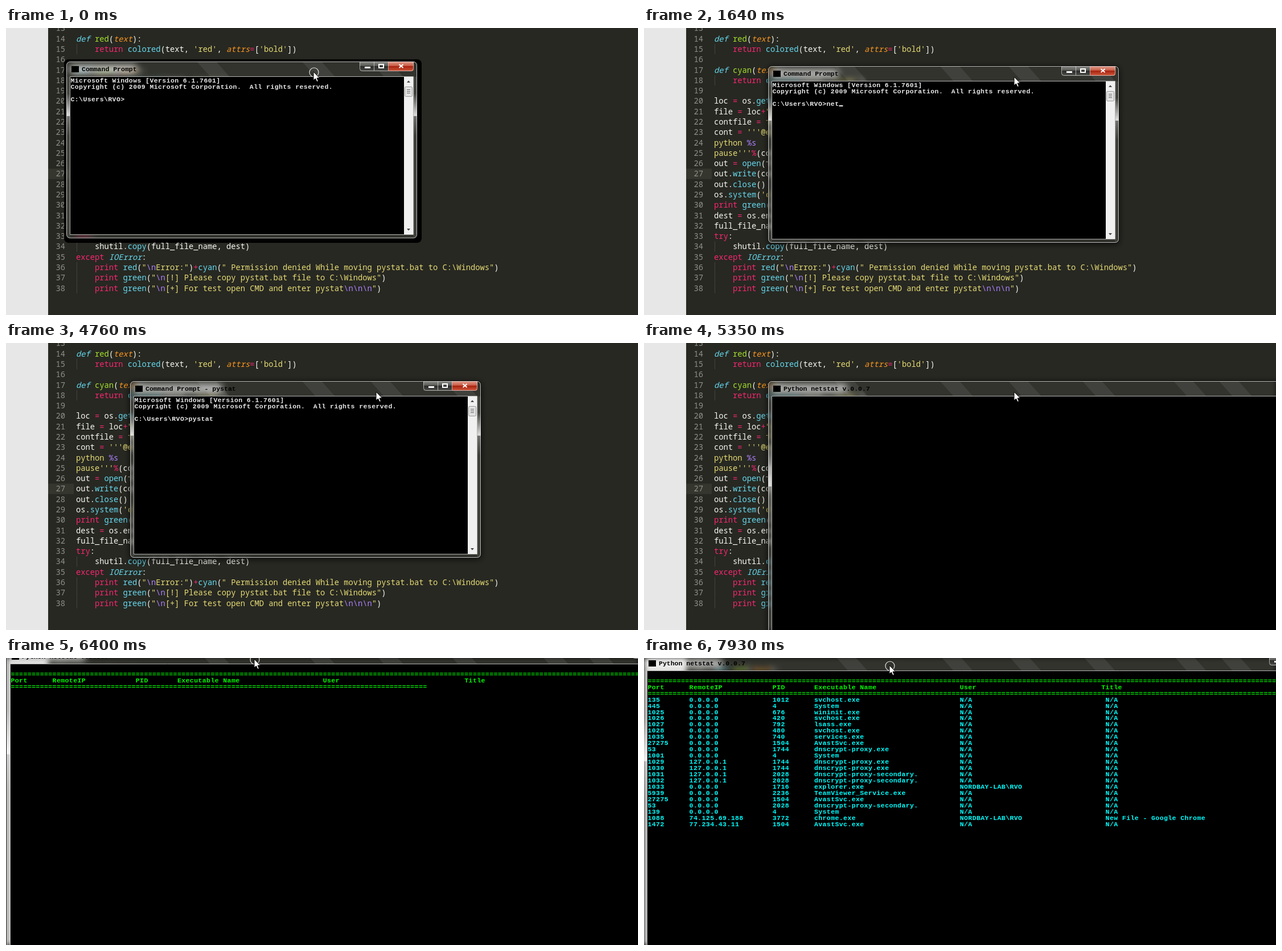
Animation of 1110 by 505 pixels, one loop 8 s. Source, as an HTML page with a canvas:

```html
<!DOCTYPE html>
<html lang="en">
<head>
<meta charset="utf-8">
<title>Command prompt over a code editor</title>
<style>
html, body { margin: 0; width: 1110px; height: 505px; overflow: hidden; background: #272822; }
canvas { display: block; }
</style>
</head>
<body>
<canvas id="stage" width="1110" height="505"></canvas>
<script>
const W = 1110, H = 505, LOOP = 8000;
const ctx = document.getElementById('stage').getContext('2d');

// ---------- Editor page ----------
// Each piece starts with its style letter; a capital means italic.
const INK = { w: '#f8f8f2', p: '#f92672', b: '#66d9ef', g: '#a6e22e', o: '#fd971f', y: '#e6db74', v: '#ae81ff' };
const SOURCE = [
  '',
  'Bdef |gred|w(|Otext|w):',
  "w    |preturn |bcolored|w(text, |y'red'|w, |Oattrs|p=|w[|y'bold'|w])",
  '',
  'Bdef |gcyan|w(|Otext|w):',
  "w    |preturn |bcolored|w(text, |y'cyan'|w)",
  '',
  'wloc |p= |wos.|bgetcwd|w()',
  'wfile |p= |wloc|p+|y"pystat.py"',
  'wcontfile |p= |yfile',
  "wcont |p= |y'''@echo off",
  'ypython |v%s',
  "ypause'''|p%|w(contfile)",
  'wout |p= |bopen|w(file)',
  'wout.|bwrite|w(cont)',
  'wout.|bclose|w()',
  "wos.|bsystem|w(|y'cls'|w)",
  'pprint |bgreen|w(loc)',
  'wdest |p= |wos.environ',
  'wfull_file_name |p= |wfile',
  'ptry|w:',
  'w    shutil.|bcopy|w(full_file_name, dest)',
  'pexcept |BIOError|w:',
  'w    |pprint |bred|w(|y"|v\\n|yError:"|w)|p+|bcyan|w(|y" Permission denied While moving pystat.bat to C:\\Windows"|w)',
  'w    |pprint |bgreen|w(|y"|v\\n|y[!] Please copy pystat.bat file to C:\\Windows"|w)',
  'w    |pprint |bgreen|w(|y"|v\\n|y[+] For test open CMD and enter pystat|v\\n\\n\\n|y"|w)'
];
const CODE_FONT = '13.75px "Noto Sans Mono", monospace', CODE_CELL = 8.25, CODE_LINE = 18.29;

function drawPage() {
  const page = document.createElement('canvas');
  page.width = W;
  page.height = H;
  const c = page.getContext('2d');
  const box = (color, x, y, w, h) => { c.fillStyle = color; c.fillRect(x, y, w, h); };
  box('#272822', 0, 0, W, H);
  box('#e7e7e7', 0, 0, 74, H);
  box('#35362e', 74, 247.5, 45, 18.3);
  SOURCE.forEach((line, i) => {
    const y = 5.4 + i * CODE_LINE;
    c.font = CODE_FONT;
    c.fillStyle = '#8f908a';
    c.textAlign = 'right';
    c.fillText(13 + i, 104, y);
    c.textAlign = 'left';
    if (line.startsWith('w    ')) box('#42433c', 124, y - 14, 1, CODE_LINE);
    let x = 123;
    for (const piece of line.split('|').filter(Boolean)) {
      const style = piece[0], text = piece.slice(1), low = style.toLowerCase();
      c.font = (style === low ? '' : 'italic ') + CODE_FONT;
      c.fillStyle = INK[low];
      c.fillText(text, x, y);
      x += text.length * CODE_CELL;
    }
  });
  return page;
}
const page = drawPage();

// ---------- Console contents ----------
const CELL = 7.31, ROW = 10.97, COLS = 160;
const LIME = '#00ff00', AQUA = '#00ffff', PALE = '#e8e8e8';
const USER = 'NORDBAY-LAB\\RVO';

const columns = (port, ip, pid, exe, user, title) =>
  (port.padEnd(10) + ip.padEnd(20) + pid.padEnd(10) + exe.padEnd(35) + user).padEnd(title === 'Title' ? 109 : 110) + title;

const CONNECTIONS = `135 0.0.0.0 1012 svchost.exe
445 0.0.0.0 4 System
1025 0.0.0.0 676 wininit.exe
1026 0.0.0.0 420 svchost.exe
1027 0.0.0.0 792 lsass.exe
1028 0.0.0.0 480 svchost.exe
1035 0.0.0.0 740 services.exe
27275 0.0.0.0 1504 AvastSvc.exe
53 0.0.0.0 1744 dnscrypt-proxy.exe
1001 0.0.0.0 4 System
1029 127.0.0.1 1744 dnscrypt-proxy.exe
1030 127.0.0.1 1744 dnscrypt-proxy.exe
1031 127.0.0.1 2028 dnscrypt-proxy-secondary.
1032 127.0.0.1 2028 dnscrypt-proxy-secondary.
1033 0.0.0.0 1716 explorer.exe
5939 0.0.0.0 2236 TeamViewer_Service.exe
27275 0.0.0.0 1504 AvastSvc.exe
53 0.0.0.0 2028 dnscrypt-proxy-secondary.
139 0.0.0.0 4 System
1088 74.125.69.188 3772 chrome.exe
1472 77.234.43.11 1504 AvastSvc.exe`.split('\n').map(line => {
  const cells = line.split(' '), exe = cells[3];
  const own = exe === 'explorer.exe' || exe === 'chrome.exe';
  return columns(...cells, own ? USER : 'N/A', exe === 'chrome.exe' ? 'New File - Google Chrome' : 'N/A');
});
const RULE = '='.repeat(COLS);
const TABLE = ['', RULE, columns('Port', 'RemoteIP', 'PID', 'Executable Name', 'User', 'Title'), RULE, ...CONNECTIONS];
const PROMPT = 'C:\\Users\\RVO>';
const BANNER = ['Microsoft Windows [Version 6.1.7601]',
  'Copyright (c) 2009 Microsoft Corporation.  All rights reserved.', ''];

// ---------- Timeline ----------
const TYPED = [[0, ''], [1400, 'n'], [1520, 'ne'], [1640, 'net'], [2200, 'ne'], [2350, 'n'], [2500, ''],
  [2650, 'p'], [2800, 'py'], [3260, 'pys'], [3440, 'pyst'], [3620, 'pysta'], [3800, 'pystat']];
const CARET_FLIPS = [534, 1120, 1640, 2200, 2650, 3260, 3620, 3800, 4110, 4760];
const TITLES = [[0, 'Command Prompt'], [4260, 'Command Prompt - pystat'], [5350, 'Python netstat v.0.0.7']];
// start, end, number of hard steps
const STEPS = [[120, 810, 6], [5350, 6250, 7], [6400, 7330, 8], [7480, 7930, 4]];
// time, window x, y, pointer x, y, printed table rows
const KEYS = [
  [0, 106, 59, 540, 77, 0],
  [810, 218, 67, 650, 86, 0],
  [5350, 218, 67, 650, 86, 0],
  [5500, 218, 67, 650, 86, 4],
  [5800, 163, 43, 571, 51, 9],
  [6250, 10, -13, 444, 5, 25],
  [6400, 1, -16, 436, 2, 3.625],
  [7330, 5, -3, 436, 16, 9.625],
  [7930, -1, -4, 431, 13, 25]
];

const latest = (list, t) => list.findLast(item => item[0] <= t)[1];

function snap(t) {
  let time = 0;
  for (const [start, end, n] of STEPS) {
    if (t < start) break;
    const gap = (end - start) / (n - 1);
    time = start + gap * Math.min(n - 1, Math.floor((t - start) / gap + 1e-6));
  }
  return time;
}

function pose(time) {
  const i = KEYS.findLastIndex(key => key[0] <= time), a = KEYS[i], b = KEYS[i + 1] || a;
  const k = b === a ? 0 : (time - a[0]) / (b[0] - a[0]);
  return a.map((v, j) => v + (b[j] - v) * k).slice(1);
}

// ---------- Drawing ----------
function fill(color, x, y, w, h, radius = 0) {
  ctx.fillStyle = color;
  ctx.beginPath();
  ctx.roundRect(x, y, w, h, radius);
  ctx.fill();
}

function outline(color, x, y, w, h, radius = 0) {
  ctx.strokeStyle = color;
  ctx.lineWidth = 1;
  ctx.beginPath();
  ctx.roundRect(x + .5, y + .5, w - 1, h - 1, radius);
  ctx.stroke();
}

function polygon(color, ...points) {
  ctx.fillStyle = color;
  ctx.beginPath();
  points.forEach(([x, y]) => ctx.lineTo(x, y));
  ctx.closePath();
  ctx.fill();
}

function gradient(y0, y1, ...stops) {
  const g = ctx.createLinearGradient(0, y0, 0, y1);
  stops.forEach(([at, color]) => g.addColorStop(at, color));
  return g;
}

function drawShadow(x, y, w, h, dragged) {
  if (dragged) return fill('#000', x - 4, y - 4, w + 12, h + 12, 8);
  ctx.save();
  ctx.shadowColor = 'rgba(0,0,0,.75)';
  ctx.shadowBlur = 12;
  ctx.shadowOffsetY = 2;
  fill('#000', x, y, w, h, 6);
  ctx.restore();
}

function drawGlass(x, y, w, h, title) {
  ctx.save();
  ctx.beginPath();
  ctx.roundRect(x, y, w, h, 6);
  ctx.clip();
  ctx.filter = 'blur(4px)';
  ctx.drawImage(page, 0, 0);
  ctx.filter = 'none';
  fill('rgba(130,130,125,.12)', x, y, w, h);
  for (const sx of [335, 520, 640, 770, 930, 1010])
    polygon('rgba(255,255,255,.07)', [sx, y], [sx + 34, y], [sx + 58, y + 27], [sx + 24, y + 27]);

  const shine = gradient(y, y + h, [.18, 'rgba(255,255,255,.08)'], [.3, 'rgba(255,255,255,.8)'],
    [.308, 'rgba(255,255,255,.8)'], [.31, 'rgba(255,255,255,.3)'], [.42, 'rgba(255,255,255,.06)']);
  fill(shine, x, y + 27, 7, h);
  fill(shine, x + w - 7, y + 27, 7, h);

  ctx.font = '10.4px "Open Sans", sans-serif';
  ctx.filter = 'blur(6px)';
  fill('rgba(255,255,255,.62)', x + 5, y + 5, ctx.measureText(title).width + 30, 17, 8);
  ctx.filter = 'none';
  ctx.restore();

  outline('rgba(0,0,0,.85)', x - 1, y - 1, w + 2, h + 2, 7);
  outline('rgba(235,235,235,.75)', x, y, w, h, 6);
  fill('#000', x + 9, y + 8, 13, 11);
  ctx.fillStyle = '#000';
  ctx.fillText(title, x + 27, y + 17);
}

function drawButtons(right, y) {
  const gray = gradient(y, y + 17, [0, '#8b8b88'], [.48, '#555552'], [.5, '#2c2c2a'], [1, '#4d4d4a']);
  const red = gradient(y, y + 17, [0, '#e0a090'], [.48, '#c8553f'], [.5, '#a82410'], [1, '#d0583c']);
  fill(gray, right - 101, y, 51, 17, [0, 0, 0, 4]);
  fill(red, right - 50, y, 44, 17, [0, 0, 4, 0]);
  outline('rgba(220,220,220,.7)', right - 101, y, 95, 17, [0, 0, 4, 4]);
  fill('rgba(220,220,220,.7)', right - 76, y, 1, 16);
  fill('rgba(220,220,220,.7)', right - 51, y, 1, 16);
  fill('#fff', right - 92, y + 9, 10, 3);
  ctx.strokeStyle = '#fff';
  ctx.lineWidth = 2;
  ctx.strokeRect(right - 67, y + 5, 8, 6);
  ctx.beginPath();
  for (const s of [-1, 1]) {
    ctx.moveTo(right - 28 - 3.5 * s, y + 5);
    ctx.lineTo(right - 28 + 3.5 * s, y + 11);
  }
  ctx.stroke();
}

function drawScrollbar(x, y, h) {
  fill('#f0f0f0', x, y, 16, h);
  const mid = x + 8;
  polygon('#444', [mid - 3, y + 10], [mid + 3, y + 10], [mid, y + 6.5]);
  polygon('#444', [mid - 3, y + h - 10], [mid + 3, y + h - 10], [mid, y + h - 6.5]);
  fill('#e2e2e2', x + 1, y + 17, 14, 18, 2);
  outline('#979797', x + 1, y + 17, 14, 18, 2);
  for (let i = 0; i < 3; i++) fill('#666', x + 5, y + 22 + i * 3, 6, 1);
}

function drawPointer(x, y, pressed) {
  if (pressed) {
    ctx.strokeStyle = '#e4e4e4';
    ctx.lineWidth = 1.2;
    ctx.beginPath();
    ctx.arc(x + 1, y + 1, 8, 0, 7);
    ctx.stroke();
  }
  polygon('#fff', [x, y], [x, y + 15], [x + 3.5, y + 12], [x + 6, y + 17.5], [x + 8.4, y + 16.5],
    [x + 6, y + 11], [x + 10.7, y + 11]);
  ctx.strokeStyle = '#000';
  ctx.lineWidth = 1;
  ctx.stroke();
}

function draw(t) {
  const [x, y, px, py, printed] = pose(snap(t)).map((v, i) => i < 4 ? Math.round(v) : v);
  const wide = t >= 5350, w = wide ? 1200 : 616, h = wide ? 600 : 311;
  const dragged = t < 810 || (t >= 5650 && t < 6400);

  ctx.drawImage(page, 0, 0);
  drawShadow(x, y, w, h, dragged);
  drawGlass(x, y, w, h, latest(TITLES, t));
  drawButtons(x + w, y);
  fill('#000', x + 7, y + 27, w - 13, h - 34);
  outline('#b4b4b4', x + 6, y + 26, w - 12, h - 32);
  drawScrollbar(x + w - 23, y + 27, h - 34);

  ctx.font = 'bold 11.5px "Liberation Mono", monospace';
  ctx.letterSpacing = CELL - ctx.measureText('0').width + 'px';
  const write = (text, row, color) => {
    ctx.fillStyle = color;
    ctx.fillText(text, x + 7.5, y + 36.7 + row * ROW);
  };
  if (wide) {
    TABLE.forEach((text, row) => {
      const shown = Math.round(COLS * Math.min(1, printed - row));
      if (shown > 0) write(text.slice(0, shown), row, row < 4 ? LIME : AQUA);
    });
  } else {
    const command = PROMPT + latest(TYPED, t), entered = t >= 4110;
    [...BANNER, command].forEach((text, row) => write(text, row, PALE));
    if (CARET_FLIPS.filter(flip => flip <= t).length % 2)
      fill(PALE, x + 7.5 + (entered ? 0 : command.length * CELL), y + 69 + (entered ? ROW : 0), 7, 2);
  }
  ctx.letterSpacing = '0px';

  drawPointer(px, py, t < 810 || t >= 5650);
}

const start = performance.now();
function frame() {
  draw((performance.now() - start) % LOOP);
  requestAnimationFrame(frame);
}
frame();
</script>
</body>
</html>
```
